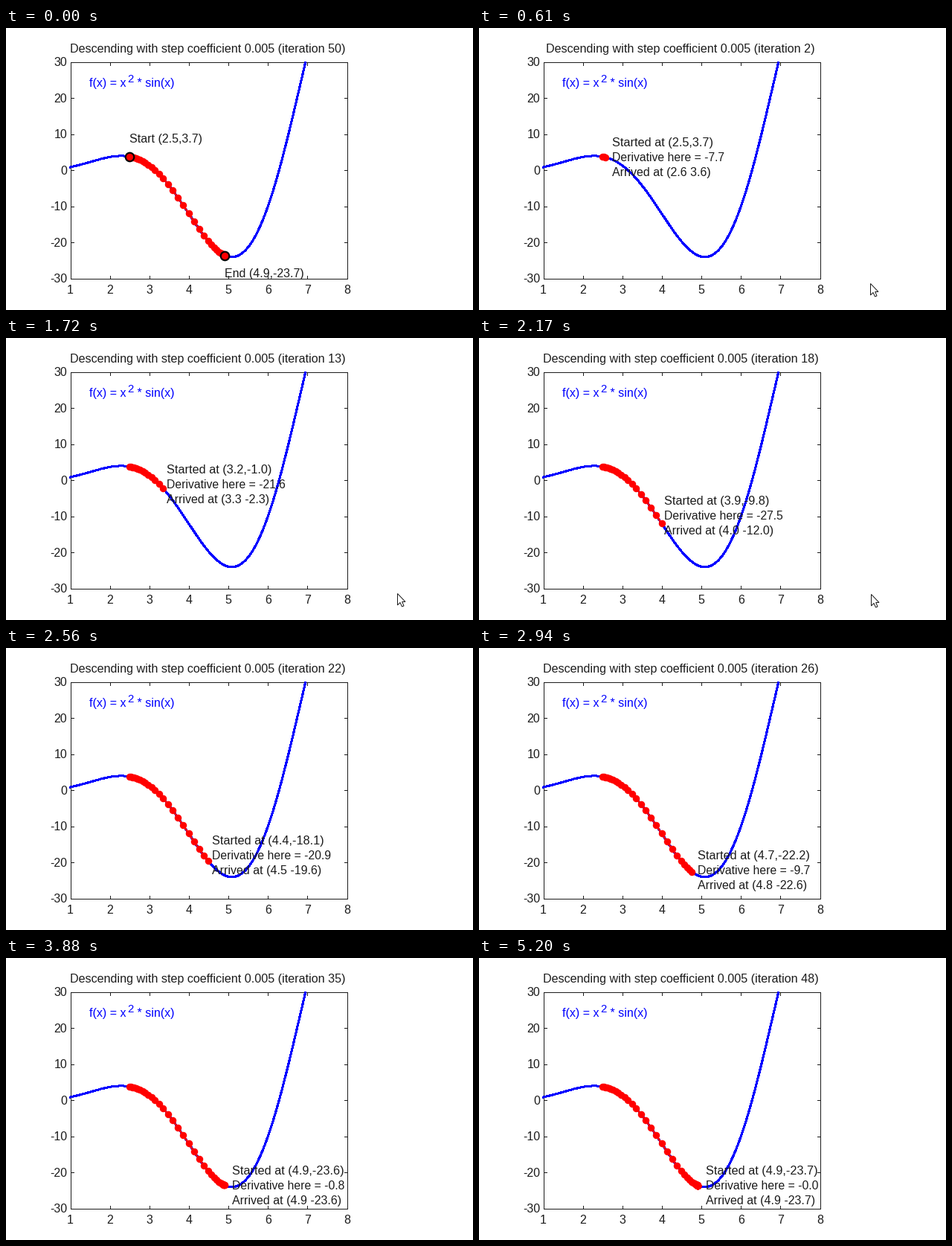
Write a matplotlib script that moves like this. It is 628x379 px and loops after 5.27 s.

```python
import numpy as np
import matplotlib.pyplot as plt
from matplotlib.animation import FuncAnimation
from matplotlib.patches import Polygon

W, H, DPI = 628, 379, 100
LOOP, STEP = 5270, 17
PT = 72 / DPI                        # points per pixel
LEFT, RIGHT, TOP, BOTTOM = 86.5, 458.5, 45.5, 336.5
RATE, LAST = 0.005, 50
INK = "#1c1c1c"

# The screen refreshes on a fixed tick; the descent runs a little slower
REFRESH_START, REFRESH = 285, 78
ITER_PER_TICK, ITER_LAG = 0.7797, 0.383

plt.rcParams["font.family"] = "Liberation Sans"


def f(x):
    return x ** 2 * np.sin(x)


def slope(x):
    return 2 * x * (np.sin(x) + x * np.cos(x))


def px(x):
    return LEFT + (x - 1) * (RIGHT - LEFT) / 7


def py(y):
    return BOTTOM - (y + 30) * (BOTTOM - TOP) / 60


def baseline(y):
    """Pixel baseline of text centred on the value y."""
    return np.floor(py(y)) + 6


path = [2.5]
for _ in range(LAST):
    path.append(path[-1] - RATE * slope(path[-1]))
path = np.array(path)

fig = plt.figure(figsize=(W / DPI, H / DPI), dpi=DPI, facecolor="white")
ax = fig.add_axes([0, 0, 1, 1])
ax.set_xlim(0, W)
ax.set_ylim(H, 0)
ax.axis("off")


def label(x, y, text="", size=16, ha="left", color=INK):
    return ax.text(x, y, text, fontsize=size * PT, ha=ha, va="baseline",
                   color=color, zorder=6)


def line(x, y, color, width, **kw):
    return ax.plot(x, y, color=color, lw=width * PT, **kw)[0]


def draw_axes():
    style = dict(color=INK, width=1, zorder=1, snap=True)
    line([LEFT, RIGHT, RIGHT, LEFT, LEFT], [TOP, TOP, BOTTOM, BOTTOM, TOP],
         **style)
    for n in range(1, 9):
        x = px(n)
        for edge, inward in ((TOP, 4), (BOTTOM, -4)):
            line([x, x], [edge, edge + inward], **style)
        label(x, 357, str(n), ha="center")
    for v in range(-30, 31, 10):
        y = py(v)
        for edge, inward in ((LEFT, 4), (RIGHT, -4)):
            line([edge, edge + inward], [y, y], **style)
        label(82, baseline(v), str(v), ha="right")


draw_axes()

xs = np.linspace(1, 8, 1200)
xs = xs[f(xs) <= 30]
line(px(xs), py(f(xs)), "blue", 2, zorder=2, antialiased=False)

label(112, 79, "f(x) = x", color="blue")
label(163, 73, "2", size=15, color="blue")
label(172.5, 79, " * sin(x)", color="blue")

title = label(271, 33, size=16.15, ha="center")
trail = line([], [], "red", 2.5, zorder=3, marker="o", ms=9.5 * PT, mew=0)
notes = [label(0, 0, size=s) for s in (16.2, 15.8, 16)]

ends = path[[0, LAST]]
rings = line(px(ends), py(f(ends)), "none", 0, zorder=4, marker="o",
             ms=11.5 * PT, mew=2.2 * PT, mfc="red", mec="black")
captions = [label(px(x), baseline(f(x) + dy), f"{name} ({x:.1f},{f(x):.1f})")
            for name, x, dy in zip(("Start", "End"), ends, (5, -5))]

ARROW = np.array([(0, 0), (0, 15.5), (3.5, 12), (6, 17.5), (8.5, 16.5),
                  (6.2, 11), (10.5, 11)])
REST, AWAY = np.array([526.5, 343.5]), np.array([9, 23])
pointer = Polygon(ARROW, closed=True, fc="white", ec=INK, lw=PT, zorder=8)
ax.add_patch(pointer)


def move_pointer(tick):
    """Glide in from below, rest, then speed up on the way out."""
    away = max(1 - tick / 2, (tick - 23) / 3, 0)
    pointer.set_xy(ARROW + REST + np.round(AWAY * away ** 2.5))
    pointer.set_visible(0 <= tick <= 26)


def update(i):
    tick = (i * STEP + STEP - 1 - REFRESH_START) // REFRESH
    n = int(np.floor(ITER_PER_TICK * tick - ITER_LAG))
    if n < 1:
        n = LAST                     # still showing the finished run
    done = n == LAST

    title.set_text(f"Descending with step coefficient {RATE} (iteration {n})")
    seen = path[:n + 1]
    trail.set_data(px(seen), py(f(seen)))

    a, b = path[n - 1], path[n]
    lines = (f"Started at ({a:.1f},{f(a):.1f})",
             f"Derivative here = {slope(a):.1f}",
             f"Arrived at ({b:.1f} {f(b):.1f})")
    for row, (note, text) in enumerate(zip(notes, lines), start=-1):
        note.set_text(text)
        note.set_position((px(a + 0.2), baseline(f(a)) + 20 * row))
        note.set_visible(not done)
    for part in (rings, *captions):
        part.set_visible(done)

    move_pointer(tick)
    return [title, trail, rings, pointer, *notes, *captions]


anim = FuncAnimation(fig, update, frames=LOOP // STEP, interval=STEP,
                     repeat=True, repeat_delay=0, blit=False)
plt.show()
```
